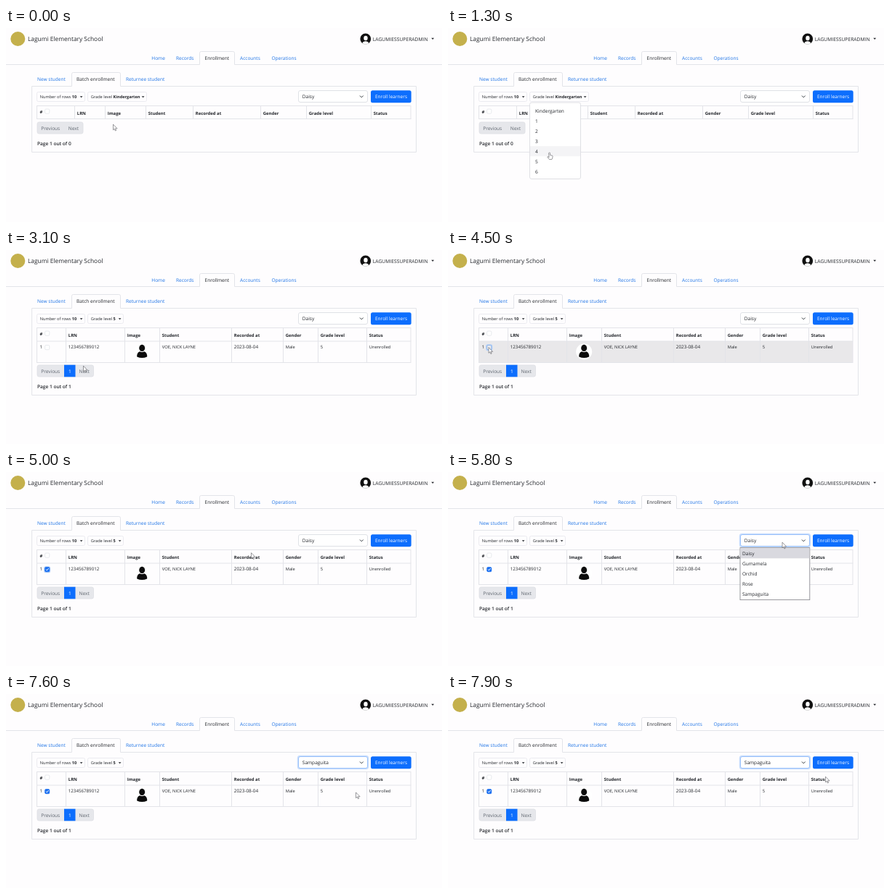
These frames come from a looping animation (600x268 px, 8 s). An HTML page:

```html
<!DOCTYPE html>
<html lang="en">
<head>
<meta charset="utf-8">
<title>Batch enrollment</title>
<style>
  html, body { margin: 0; width: 100%; height: 100%; overflow: hidden; background: #fefdfe; }
  svg { display: block; width: 600px; height: 268px; }
  text { font-family: "Open Sans", "Noto Sans", sans-serif; text-rendering: geometricPrecision; white-space: pre; }
</style>
</head>
<body>
<svg id="stage" viewBox="0 0 600 268"></svg>
<script>
const LOOP = 8000, STEP = 100;
const INK = '#24272c', BLUE = '#0d6efd', LINK = '#1f74e6', LINE = '#e3e4e9', PAPER = '#fefdfe', GREY = '#e6e7eb';
const stage = document.getElementById('stage');

// Pointer path: time, x, y of the tip
const path = [
  [0, 147.5, 133.5], [100, 147.5, 133.5], [600, 151, 96], [800, 150, 97],
  [1300, 139.5, 172], [1600, 140, 182], [2600, 140, 182],
  [3100, 106.5, 160.5], [3500, 67, 156], [4000, 56, 135], [4600, 56, 135],
  [5200, 436, 104], [5500, 460, 97.5], [6000, 460, 97.5],
  [6800, 423, 170], [7200, 423, 170], [7900, 519.5, 114.5], [8000, 519.5, 114.5]
];

const columns = ['LRN', 'Image', 'Student', 'Recorded at', 'Gender', 'Grade level', 'Status'];
const emptyCols = [94.5, 136.5, 192.5, 257.5, 350.5, 413.5, 502.5];
const filledCols = [82.5, 163.5, 211.5, 310.5, 381.5, 429.5, 496.5];
const record = [['123456789012', 6.2], null, ['VOE, NICK LAYNE', 5.85], ['2023-08-04', 6.4], ['Male', 5.7], ['5', 5.9], ['Unenrolled', 5.7]];
const grades = ['Kindergarten', '1', '2', '3', '4', '5', '6'];
const sections = ['Daisy', 'Gumamela', 'Orchid', 'Rose', 'Sampaguita'];

const text = (x, y, s, size = 6.55, fill = INK, weight = 400) =>
  `<text x="${x}" y="${y}" font-size="${size}" fill="${fill}" font-weight="${weight}">${s}</text>`;
const box = (x, y, w, h, fill, stroke = 'none', r = 0, sw = 1) =>
  `<rect x="${x}" y="${y}" width="${w}" height="${h}" rx="${r}" fill="${fill}" stroke="${stroke}" stroke-width="${sw}"/>`;
const shape = (d, fill, stroke = 'none', sw = 1) =>
  `<path d="${d}" fill="${fill}" stroke="${stroke}" stroke-width="${sw}" stroke-linejoin="round" stroke-linecap="round"/>`;
const oval = (x, y, rx, fill, ry = rx) => `<ellipse cx="${x}" cy="${y}" rx="${rx}" ry="${ry}" fill="${fill}"/>`;
const caret = (x, y) => shape(`M${x} ${y}h3.8l-1.9 2.1z`, INK);

function pointerAt(t) {
  const i = path.findIndex((p, k) => t >= p[0] && t < path[k + 1][0]);
  const [t0, x0, y0] = path[i], [t1, x1, y1] = path[i + 1];
  const u = (t - t0) / (t1 - t0), e = u * u * (3 - 2 * u);
  return [x0 + (x1 - x0) * e, y0 + (y1 - y0) * e];
}

function header() {
  const links = [['Home', 200.3], ['Records', 234], ['Accounts', 322], ['Operations', 365.5]];
  return oval(16.3, 15, 10, '#c4b04c')
    + text(30, 17.8, 'Lagumi Elementary School', 8.4)
    + oval(494.8, 15, 7.4, '#111')
    + shape('M490.3 21a4.8 4.2 0 0 1 9 0a7.4 7.4 0 0 1-9 0z', '#fff')
    + oval(495, 14, 2.7, '#fff', 3.3)
    + text(504.8, 17.5, 'LAGUMIESSUPERADMIN', 6.75) + caret(585.3, 13.8)
    + shape('M0 50.5H266.5V34.5q0-2 2-2H312.5q2 0 2 2V50.5H600', 'none', LINE)
    + links.map(([s, x]) => text(x, 44.4, s, 6.55, LINK)).join('')
    + text(273.5, 44.4, 'Enrollment');
}

function panel(bottom) {
  return shape(`M36 80.5H90.5V63.5q0-2 2-2H155.5q2 0 2 2V80.5H564.5V${bottom}H36z`, 'none', LINE)
    + text(43, 73.4, 'New student', 6.55, LINK)
    + text(97, 73.4, 'Batch enrollment')
    + text(165, 73.4, 'Returnee student', 6.55, LINK);
}

function filterButton(x, w, label, value) {
  return box(x, 88.5, w, 13, PAPER, '#ebebf0', 2)
    + text(x + 4.3, 97.2, `${label} <tspan font-weight="700">${value}</tspan>`, 5.62)
    + caret(x + w - 6.8, 94.2);
}

function toolbar(grade, section, focus) {
  return filterButton(42.5, 66, 'Number of rows', '10')
    + filterButton(112.5, grade === '5' ? 49 : 81, 'Grade level', grade)
    + (focus ? box(401.6, 85.6, 96.8, 17.8, 'none', '#c9defd', 3.2, 1.7) : '')
    + box(402.5, 86.5, 95, 16, '#fff', focus ? '#8fbafa' : '#dcdfe4', 2.5, .9)
    + text(407.8, 97.4, section)
    + shape('M487.2 93.8l2.1 2.1l2.1-2.1', 'none', '#343a40', 1)
    + box(502, 86.3, 55.7, 17, BLUE, 'none', 2.5)
    + text(508, 97.2, 'Enroll learners', 6.5, '#fff');
}

function checkbox(y, checked, focus) {
  const edge = checked ? '#1a6ff0' : focus ? '#78a5e6' : '#dfe1e6';
  return (focus ? box(52.2, y - 1.3, 9, 9, '#b5d1f8', 'none', 2.5) : '')
    + box(53.6, y, 6.2, 6.2, checked ? edge : focus ? '#e8e9ed' : '#fff', edge, 1.5, .7)
    + (checked ? shape(`M55.1 ${y + 3.2}l1.2 1.2l2.1-2.5`, 'none', '#fff', 1) : '');
}

function table(s) {
  const xs = s.filled ? filledCols : emptyCols, bottom = s.filled ? 155.5 : 125.5;
  let out = s.rowHover ? box(43, 126, 514, 29, '#e9e8ea') : '';
  out += box(42.5, 107.5, 514.5, bottom - 107.5, 'none', LINE)
    + shape(`M42.5 ${s.filled ? 126 : 125.5}H557` + xs.map(x => `M${x} 107.5V${bottom}`).join(''), 'none', LINE)
    + text(46.5, 117.8, '#', 5.9, INK, 700) + checkbox(112, false, false)
    + columns.map((c, i) => text(xs[i] + 3.3, 120, c, 5.95, INK, 700)).join('');
  if (!s.filled) return out;
  return out + text(46.5, 136.4, '1', 6.2) + checkbox(131.5, s.checked, s.boxFocus)
    + record.map((c, i) => c ? text(xs[i] + 3.3, 136.4, c[0], c[1]) : '').join('')
    + oval(187.2, 140.5, 11, '#fff')
    + oval(187.2, 135.4, 4, '#0c0c0c', 4.6)
    + shape('M180.2 147.4q-.1-6.4 4.2-7.2q2.8 1.8 5.6 0q4.3.8 4.2 7.2q-7 3-14 0z', '#0c0c0c');
}

function pager(filled) {
  const y = filled ? 159 : 130, w = filled ? 77.5 : 63;
  return box(43, y, w, 16, GREY, '#dddfe4', 2.5, .8)
    + text(48.2, y + 10.6, 'Previous', 6.55, '#5f666f')
    + (filled ? box(80, y - .3, 15.5, 16.6, BLUE) + text(86, y + 10.6, '1', 6.55, '#fff') : '')
    + text(filled ? 100.5 : 85.8, y + 10.6, 'Next', 6.55, '#5f666f')
    + text(43, y + 31.6, `Page 1 out of ${filled ? 1 : 0}`, 6.55, INK, 600);
}

function menu(x, y, w, h, items, textX, hover, shade, border, r) {
  const pad = r ? 4.2 : .7, row = 14;
  return box(x, y, w, h, '#fff', border, r, .9)
    + (hover >= 0 && hover < items.length ? box(x + .5, y + pad + hover * row, w - 1, row, shade) : '')
    + items.map((s, i) => text(textX, y + pad + 9.4 + i * row, s)).join('');
}

function cursor([x, y], hand) {
  const d = hand
    ? 'M-.7 .5q.8-.9 1.6 0v3.1l3 .7q.8.3.7 1.1l-.5 2.6-.8 1.6h-3.3l-2.5-3q-.4-1.2.7-.9l1.1.8z'
    : 'M0 0V7.3l1.7-1.5 1.2 2.7 1.2-.5-1.2-2.6h2.3z';
  return `<g transform="translate(${x.toFixed(2)} ${y.toFixed(2)})">${shape(d, '#fff', '#55555a', .6)}</g>`;
}

function draw(t) {
  const tip = pointerAt(t), y = tip[1];
  const filled = t >= 1900, gradeOpen = t >= 700 && t < 1700;
  const listOpen = t >= 5500 && t < 7100;
  const hand = t < 1900 && y < 103 || gradeOpen && y > 107;
  const state = {
    filled,
    rowHover: filled && t < 5400 && y > 126 && y < 155.5,
    checked: t >= 4600,
    boxFocus: t >= 4500 && t < 5400
  };
  let out = header() + panel(filled ? 200.5 : 171.5)
    + toolbar(t < 1700 ? 'Kindergarten' : '5', t < 7100 ? 'Daisy' : 'Sampaguita', t >= 5400)
    + table(state) + pager(filled);
  if (gradeOpen) {
    const hover = y < 107 ? -1 : Math.floor((y - 107) / 14);
    out += menu(112.5, 103, 70, 105.5, grades, 120, hover, '#f4f4f6', '#dcdde1', 2.5);
  }
  if (listOpen) {
    const hover = Math.max(0, Math.min(4, Math.floor((y - 105) / 14)));
    out += menu(402, 104.6, 95.8, 72, sections, 405, hover, '#d9d9df', '#8c8d92', 0);
  }
  stage.innerHTML = out + cursor(tip, hand);
}

let last = -1;
function tick(now) {
  const t = Math.floor(now % LOOP / STEP) * STEP;
  if (t !== last) draw(last = t);
  requestAnimationFrame(tick);
}
draw(0);
requestAnimationFrame(tick);
</script>
</body>
</html>
```
